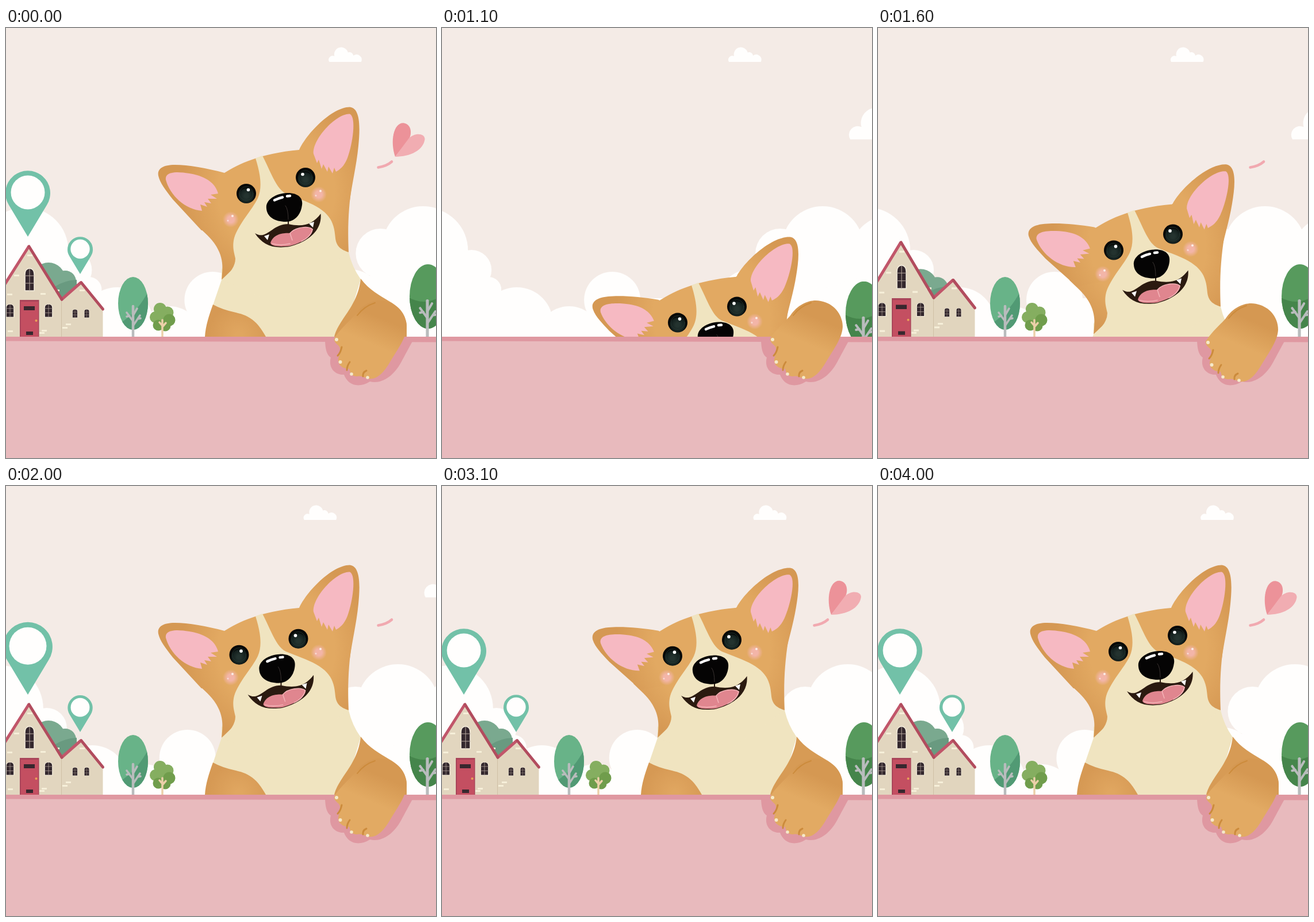
Animation of 748 by 748 pixels, one loop 4100 ms. Source, as an HTML page:

```html
<!DOCTYPE html>
<html lang="en">
<head>
<meta charset="utf-8">
<title>Corgi peeking over a wall</title>
<style>
  html, body { margin: 0; width: 100%; height: 100%; overflow: hidden; background: #f4ebe6 }
  svg { display: block; width: 100vw; height: 100vh }
  .line { fill: none; stroke-linecap: round; stroke-linejoin: round }
</style>
</head>
<body>
<svg viewBox="0 0 748 748">
  <defs>
    <radialGradient id="fur" gradientUnits="userSpaceOnUse" cx="470" cy="285" r="185">
      <stop offset=".55" stop-color="#e2a962"/><stop offset=".9" stop-color="#d59853"/>
    </radialGradient>
    <linearGradient id="pawFur" gradientUnits="userSpaceOnUse" x1="662" y1="490" x2="628" y2="570">
      <stop offset=".2" stop-color="#d59852"/><stop offset=".75" stop-color="#e2aa63"/>
    </linearGradient>
    <radialGradient id="bodyFur" gradientUnits="userSpaceOnUse" cx="405" cy="535" r="60">
      <stop offset=".1" stop-color="#e0a660"/><stop offset=".9" stop-color="#d69954"/>
    </radialGradient>
    <radialGradient id="blush">
      <stop offset=".4" stop-color="#f3b5a8"/><stop offset="1" stop-color="#f3b5a8" stop-opacity="0"/>
    </radialGradient>
    <radialGradient id="iris" cy=".62">
      <stop offset=".2" stop-color="#24332f"/><stop offset=".7" stop-color="#14201e"/><stop offset=".85" stop-color="#060807"/>
    </radialGradient>
    <clipPath id="oval"><ellipse rx="26" ry="46"/></clipPath>
    <g id="puff">
      <path d="M0 24A7 7 0 0 1 9 14A12 12 0 0 1 32.500 7.500A7 7 0 0 1 42 13A9 9 0 0 1 55.500 24Z"/>
    </g>
    <g id="pin">
      <path fill="#72c1a8" d="M0 0L-33 -55A39 39 0 1 1 33 -55Z"/>
      <circle cy="-77" r="29.500" fill="#fffefd"/>
    </g>
    <g id="window">
      <path fill="#33272d" stroke="#f3ecdc" stroke-width="1.500" d="M-8 0V-29Q-8 -38 0 -39Q8 -38 8 -29V0Z"/>
      <path class="line" stroke="#b9aaa0" d="M0 -38V0M-8 -26H8M-8 -13H8"/>
    </g>
    <g id="branches" class="line" stroke="#b9bcbd">
      <path stroke-width="4.500" d="M0 58V4"/>
      <path stroke-width="3.500" d="M0 38L12 20M0 30L-11 15M0 20L7 8M-6 21L-11 22M8 26L13 25"/>
    </g>
    <g id="eye">
      <circle r="17" fill="url(#iris)"/>
      <circle r="12" class="line" stroke="#2c3f3a" stroke-width=".7"/>
    </g>
    <g id="cheek">
      <circle r="14" fill="url(#blush)"/><circle cx="3" cy="-6" r="2" fill="#fff" opacity=".75"/>
      <circle cx="-5" cy="2" r="1.500" fill="#fff" opacity=".5"/>
    </g>
    <g id="paw">
      <path fill="url(#pawFur)" d="M571 540C584 520 598 510 606 500C618 482 636 474 650 474C679 475 697 496 697 520C696 540 681 559 668 581C657 600 645 612 631 610C623 608 618 604 610 606C603 606 599 602 597 593C588 593 577 588 578 576C580 568 584 558 578 552C574 549 570 545 571 540Z"/>
      <g class="line" stroke="#cc8b3c" stroke-width="3">
        <path d="M584 555Q582 565 577 570M598 581Q593 588 593 595M627 596Q620 599 621 606"/>
        <path stroke-width="2" d="M611 500Q623 484 642 478"/>
      </g>
      <g fill="#f5e9ca">
        <circle cx="575" cy="542" r="3"/><circle cx="581.500" cy="581" r="3"/>
        <circle cx="601" cy="602" r="2.800"/><circle cx="629" cy="608" r="2.800"/>
      </g>
    </g>
  </defs>

  <rect width="748" height="748" fill="#f4ebe6"/>

  <g id="clouds" fill="#fffefd">
    <path d="M-150 540V387H20L60 440L110 470L210 510L282 470H500L522 470L574 410L648 370L760 380H850V540Z"/>
    <use href="#puff" x="485" y="35"/>
    <use href="#puff" transform="translate(696 142)scale(2.160)"/>
  </g>

  <g id="oak">
    <g transform="translate(734 467)scale(1.230 1.217)" clip-path="url(#oval)">
      <rect x="-26" y="-46" width="52" height="92" fill="#579a5d"/>
      <path fill="#45854b" d="M-26 2Q0 16 26 -6V46H-26Z"/>
    </g>
    <use href="#branches" transform="translate(733 470)scale(1.150)"/>
  </g>
  <g id="trees">
    <g transform="translate(221 479)" clip-path="url(#oval)">
      <rect x="-26" y="-46" width="52" height="92" fill="#68b388"/>
      <path fill="#519a74" d="M26 -20Q8 14 -20 33V46H26Z"/>
    </g>
    <use href="#branches" x="221" y="480"/>
    <g id="shrubLight" fill="#85ae60"></g>
    <g id="shrubDark" fill="#709d4c"></g>
    <path class="line" stroke="#ecd0a9" stroke-width="3.500" d="M272 538V508M272 520L278 513M272 518L267 512"/>
  </g>
  <g id="bush">
    <g id="leaves" fill="#7aa98f"></g>
    <path fill="#699a80" d="M60 480Q80 440 123 438V500H60Z"/>
  </g>

  <g id="houses">
    <path fill="#e2d6bf" d="M-20 540V470L40 380L97 472V540Z"/>
    <path fill="#e1d5be" d="M96 540V473L131 442L168.500 488V540Z"/>
    <path class="line" stroke="#cfc0a6" d="M96.500 474V537"/>
    <path id="bricks" fill="#f6efd9"/>
    <g class="line" stroke-width="5">
      <path stroke="#c1566a" d="M-20 474L39 381M97 472L130 443"/>
      <path stroke="#b24c5e" d="M40 380L97 472M131 443L168.500 489"/>
    </g>
    <use href="#window" transform="translate(41 457)"/>
    <use href="#window" transform="translate(7 503)scale(.85 .58)"/>
    <use href="#window" transform="translate(74 503)scale(.85 .58)"/>
    <use href="#window" transform="translate(120 504)scale(.55 .38)"/>
    <use href="#window" transform="translate(140.500 504)scale(.55 .38)"/>
    <path fill="#a9455a" d="M24 473H57.500V540H24Z"/>
    <path fill="#c44f61" d="M26 476H56V540H26Z"/>
    <path fill="#38272e" d="M31 484H50V491H31ZM35 528H47V534H35Z"/>
    <circle cx="52.500" cy="509" r="2" fill="#eaa257"/>
  </g>
  <use href="#pin" id="pinBig"/>
  <use href="#pin" id="pinSmall"/>

  <path id="tail" class="line" stroke="#f1a9b0" stroke-width="4.500" pathLength="1" d="M647.500 242.500C657 241 666 237 671 232.500"/>
  <g id="heart">
    <path fill="#ec9299" d="M677 224C668 198 674 166 691 166.500C704 168 706 183 701 193Z"/>
    <path fill="#f1adb2" d="M677 224L700 193C709 183 727 183 727.500 194C725 213 703 224 677 224Z"/>
  </g>

  <g id="dog">
    <path fill="#f0e4c0" d="M375 420V438L360 482L350 560H580L617 437Q602 416 596 390L560 300H420Z"/>
    <path fill="url(#bodyFur)" d="M360 481C352 503 347 520 346 537V560H465L452 537C435 506 420 500 400 495Q376 490 360 481Z"/>
    <path fill="#d79b55" d="M617 436C632 456 650 465 666 475C685 485 697 502 697 520V640H571V537C578 507 612 485 617 436Z"/>
    <path fill="url(#fur)" d="M375 438C377 418 379 402 366 380C356 364 345 356 333 344L350 270L380 252C404 237 442 218 510 212L570 225L602 270C596 310 594 345 596 390L480 400L398 416Z"/>
    <g id="earLeft">
      <path fill="url(#fur)" d="M400 265L380 252C350 244 317 238 294 238C271 238 263 246 265 257C268 270 277 281 290 298L340 352L410 345Z"/>
      <path fill="#f6b9c2" d="M278 264C276 250 296 249 319 253C344 257 364 268 369 288L356 290L367 297L351 297L357 305L345 303L350 311L338 307L341 318C312 316 285 291 278 264Z"/>
    </g>
    <g id="earRight">
      <path fill="url(#fur)" d="M495 225L510 212C522 185 566 138 598 137.500C617 139 616 175 613 205C610 237 603 265 598 300L545 290Z"/>
      <path fill="#f6b9c2" d="M598 149.500C610 155 603 202 594 226C588 241 581 246 574 250L571 243L568 253L561 241L559 250L552 237L549 245L544 229L541 235L535 219C532 194 575 148 598 149.500Z"/>
    </g>
    <path fill="#f0e4c0" d="M434 226.500C443 255 446 278 438 296C428 317 405 340 397 365C393 381 397 391 399 401Q399 420 375 438L470 480L596 390C584 386 575 381 573 366C571 334 561 318 520 301L487 288C470 280 462 253 446 222Z"/>
    <use href="#cheek" x="391" y="333"/>
    <use href="#cheek" x="544" y="289.500"/>
    <g id="face">
      <use href="#eye" x="418" y="288"/>
      <use href="#eye" x="521" y="260"/>
      <g fill="#fff"><circle cx="421.500" cy="281.500" r="2.800"/><circle cx="516" cy="254.500" r="2.800"/></g>
      <path class="line" stroke="#2b1a10" stroke-width="2" d="M491 334V344"/>
      <path fill="#2b1a10" d="M433 357C454 370 462 341 491 341C518 347 534 341 547.500 323C550 351 528 371 494 380C464 385 446 377 433 357Z"/>
      <path fill="#e0868f" d="M460 374C465 358 483 356 494 357C503 346 526 344 534 350C532 363 516 373 494 379C476 381 462 380 460 374Z"/>
      <path class="line" stroke="#f4b4b8" stroke-width="1.500" d="M494 357L498 369M494 357C503 346 526 344 533 350C531 361 521 368 514 371M463 375Q477 379 494 375"/>
      <path fill="#fff" d="M449 362L458 359L455 369ZM527 340L536 337L534 347Z"/>
      <path fill="#050404" d="M453 314C451 299 469 288 488 287C507 286 517 295 515 308C513 326 501 337 487 337C467 337 454 328 453 314Z"/>
      <path class="line" stroke="#3a3331" d="M486 309Q491 315 491 333"/>
      <path class="line" stroke="#fff" stroke-width="4.500" d="M467 299.500Q474 296 481 294.500M489 292.500L494 292"/>
    </g>
  </g>

  <use href="#paw" id="pawBehind"/>
  <path fill="#e8babd" d="M0 540H748V748H0Z"/>
  <path fill="#df98a1" d="M0 537H748V546.500L0 544.500Z"/>
  <g id="grip">
    <path fill="#df98a1" d="M555 540C555 563 560 570 565 573C560 592 573 604 588 603C594 620 612 628 633 615C653 620 674 606 687 582L707 545V538Z"/>
    <use href="#paw" id="pawFront"/>
  </g>
</svg>
<script>
const el = id => document.getElementById(id);
const place = (id, transform) => el(id).setAttribute('transform', transform);
const show = (id, on) => el(id).setAttribute('visibility', on ? 'visible' : 'hidden');

function addCircles(id, list) {
  for (const [cx, cy, r] of list)
    el(id).insertAdjacentHTML('beforeend', `<circle cx="${cx}" cy="${cy}" r="${r}"/>`);
}
addCircles('clouds', [
  [-44, 387, 75], [37, 421, 35], [67, 455, 22], [116, 514, 63], [207, 540, 56], [282, 473, 49],
  [522, 476, 56], [574, 392, 43], [648, 381, 71], [765, 396, 70]
]);
addCircles('shrubLight', [[268, 489, 11], [281, 495, 10.5], [260, 503, 10], [272, 503, 11]]);
addCircles('shrubDark', [[284, 508, 10.5], [265, 517, 9.5], [277, 518, 9.5]]);
addCircles('leaves', [[74, 437, 29], [103, 441, 19], [100, 460, 20]]);
el('bricks').setAttribute('d',
  [[37, 394], [14, 429], [60, 461], [2, 462], [62, 525], [58, 529], [84, 455], [104, 514], [98, 520], [128, 455], [3, 526]]
    .map(([x, y]) => `M${x} ${y}h9v3h-9z`).join(''));

// Eased value through [time, value] pairs.
function key(t, ...keys) {
  const i = keys.findIndex(k => k[0] > t);
  if (i < 0) return keys[keys.length - 1][1];
  if (i === 0) return keys[0][1];
  const [t0, a] = keys[i - 1], [t1, b] = keys[i];
  const p = (t - t0) / (t1 - t0);
  return a + (b - a) * p * p * (3 - 2 * p);
}

function draw(t) {
  place('clouds', `translate(${(t - 450) * 0.0218})`);

  place('oak', `translate(0 ${key(t, [800, 130], [1235, 0])})`);
  place('trees', `translate(0 ${key(t, [1100, 110], [1400, -6], [1500, 0])})`);
  place('bush', `translate(0 ${key(t, [1300, 135], [1665, 0])})`);
  place('houses', `translate(0 537)scale(1 ${key(t, [1100, 0], [1500, 1.09], [1700, 1])})translate(0 -537)`);
  place('pinBig', `translate(38 363)scale(${key(t, [1700, 0], [2000, 1.1], [2200, 1])})`);
  place('pinSmall', `translate(129 428)scale(${0.565 * key(t, [1750, 0], [2000, 0.985], [2150, 1.1], [2300, 1])})`);

  const drawn = key(t, [1200, 0], [1500, 1]);
  show('tail', drawn > 0);
  el('tail').setAttribute('stroke-dasharray', `${drawn} 2`);
  const flap = 1 + 0.03 * Math.sin((t - 2900) / 200 * Math.PI / 2);
  place('heart', `translate(677 224)scale(${key(t, [2100, 0], [2400, 1]) * flap})translate(-677 -224)`);

  const drop = key(t, [100, 440], [500, 235], [800, 221], [1300, 221], [1848, 0]);
  place('dog', `translate(0 ${drop})rotate(${key(t, [500, 1.7], [800, 0])} 480 320)`);
  const ears = key(t, [1700, 1], [1900, 0], [2300, 0], [2600, 1], [3200, 1], [3500, 0]);
  place('earLeft', `rotate(${-5.5 * ears} 375 290)`);
  place('earRight', `rotate(${4 * ears} 530 250)`);
  const look = key(t, [1700, -8], [2300, -17], [3200, -17], [3600, 0]);
  place('face', `translate(${look} ${-0.45 * look})`);

  show('pawBehind', t < 700);
  place('pawBehind', `translate(-4 ${key(t, [100, 100], [500, 8])})`);
  show('grip', t >= 700);
  const press = key(t, [1300, 0], [1600, 1], [1900, 0]);
  place('pawFront', `translate(${-press} ${key(t, [700, 45], [900, 0]) + 5 * press})`);
}

// Ten poses a second; the loop opens on its closing pose.
function tick() {
  const step = Math.floor(performance.now() % 4100 / 100) * 100;
  draw(step || 4000);
  requestAnimationFrame(tick);
}
tick();
</script>
</body>
</html>
```
